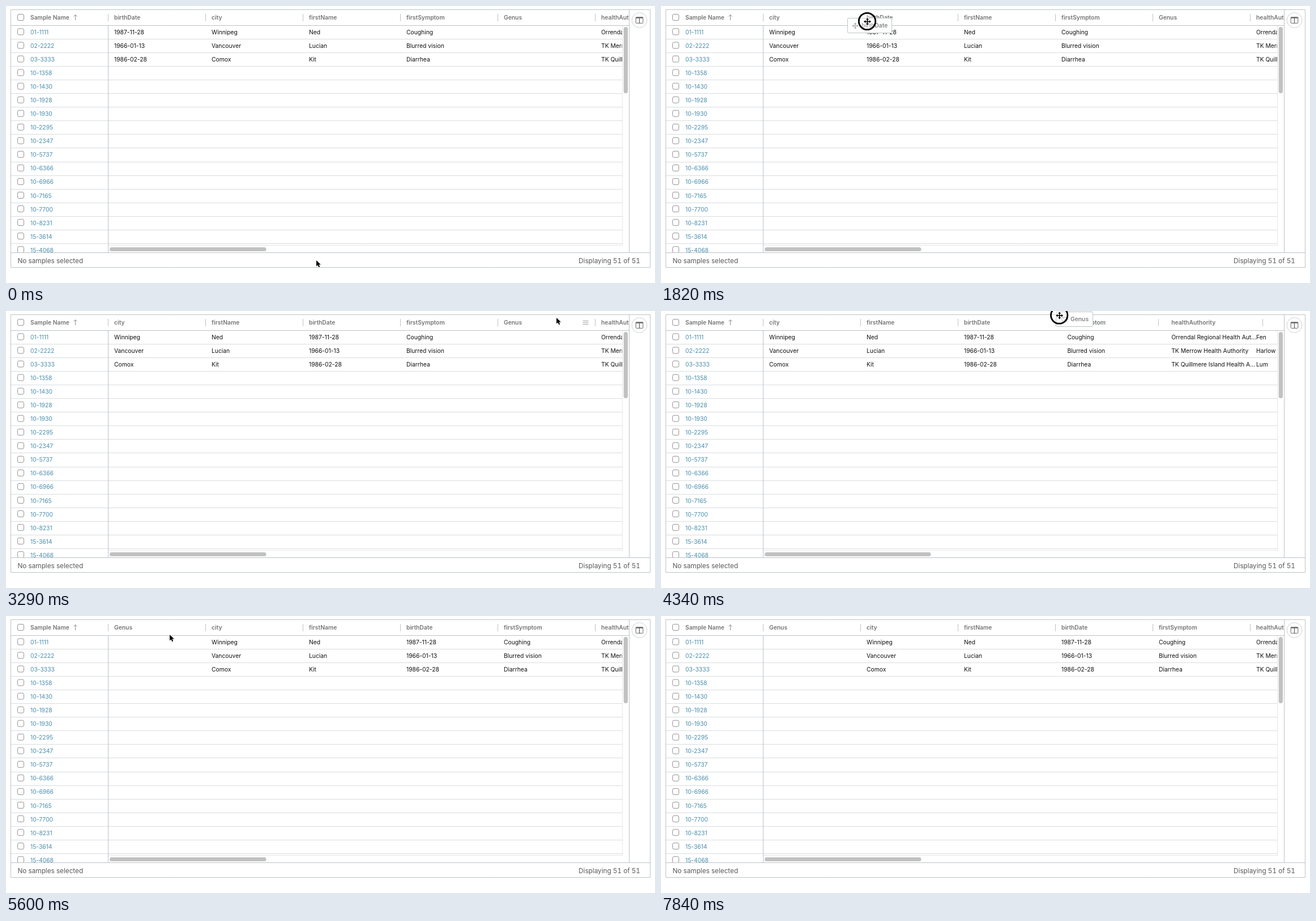
An HTML page with a canvas that plays this animation: 1146x489 px, repeating every 8400 ms.

```html
<!DOCTYPE html>
<html lang="en">
<head>
<meta charset="utf-8">
<title>Sample table column reordering</title>
<style>
  html, body { margin: 0; width: 100%; height: 100%; overflow: hidden; background: #fff; }
  canvas { display: block; }
  .status {
    position: absolute; top: 440px; line-height: 20px; white-space: nowrap;
    font: 11.75px/20px Inter, sans-serif; font-variant-numeric: tabular-nums; color: #595959;
  }
</style>
</head>
<body>
<canvas id="stage" width="1146" height="489"></canvas>
<div class="status" style="left: 20.5px">No samples selected</div>
<div class="status" style="left: 900px; width: 220px; text-align: right">Displaying 51 of 51</div>
<script>
const ctx = document.getElementById('stage').getContext('2d');
const LOOP = 8400, COL = 172, LEFT = 180, TOP = 34, ROW = 24.05;
const LINE = '#bdc3c7', ROW_LINE = '#d9dcde', GRAY = '#757575', THUMB = '#c1c1c1';
const CELL_FONT = '10.3px Inter, sans-serif';
const HEAD_FONT = '600 10.3px Inter, sans-serif';

const samples = ['01-1111', '02-2222', '03-3333', '10-1358', '10-1430', '10-1928', '10-1930', '10-2295',
  '10-2347', '10-5737', '10-6366', '10-6966', '10-7165', '10-7700', '10-8231', '15-3614', '15-4068'];

const columns = {
  b: ['birthDate', '1987-11-28', '1966-01-13', '1986-02-28'],
  c: ['city', 'Winnipeg', 'Vancouver', 'Comox'],
  f: ['firstName', 'Ned', 'Lucian', 'Kit'],
  s: ['firstSymptom', 'Coughing', 'Blurred vision', 'Diarrhea'],
  g: ['Genus'],
  h: ['healthAuthority', 'Orrendal Regional Health Authority', 'TK Merrow Health Authority',
    'TK Quillmere Island Health Authority'],
  l: ['lastName', 'Fen', 'Harlow', 'Lum']
};

// Column order from each time on; a missing letter is a hidden column.
const orders = [[-1000, 'bcfsgh'], [1600, 'cbfsgh'], [2310, 'cfbsgh'], [4173, 'cfbgsh'],
  [4186, 'cfbshl'], [4700, 'cgfbshl'], [4880, 'gcfbshl']];

// Pointer path: time, x, y.
const path = [[0, 548, 449], [70, 548, 449], [140, 548, 446], [350, 548, 446], [420, 530, 414],
  [560, 530, 414], [770, 295, 14], [980, 295, 14], [1260, 276, 13], [1330, 276, 13], [1400, 274, 17],
  [1540, 274, 17], [1730, 374, 30], [1820, 364, 27], [1950, 363, 27], [2380, 560, 25], [2660, 560, 25],
  [3290, 972, 12], [3430, 972, 12], [3500, 971, 16], [3780, 971, 16], [4060, 930, 11], [4340, 704, 7.5],
  [4620, 476, 8], [4900, 358, 29], [5110, 289, 34.5], [5250, 289, 33], [6090, 289, 33], [6720, 495, 225],
  [6930, 520, 262], [7770, 545, 492], [8400, 545, 520]];

// Press, drag start, release, dragged column.
const drags = [[1400, 1540, 2660, 'b'], [3500, 3780, 5600, 'g']];

const clamp = v => Math.max(0, Math.min(1, v));
const ease = v => (v = clamp(v), v * v * (3 - 2 * v));

function pointerAt(t) {
  const i = Math.max(1, path.findIndex(key => key[0] >= t));
  const [t0, x0, y0] = path[i - 1], [t1, x1, y1] = path[i];
  const k = clamp((t - t0) / (t1 - t0));
  return { x: x0 + (x1 - x0) * k, y: y0 + (y1 - y0) * k };
}

function placeColumn(id, t) {
  let x = null, last = 0, born = 0;
  for (const [start, order] of orders) {
    if (start > t) break;
    const index = order.indexOf(id);
    if (index < 0) x = null;
    else if (x === null) { x = LEFT + index * COL; born = start; }
    else x += (index - last) * COL * ease((t - start) / 200);
    last = index;
  }
  return { id, x, born };
}

function text(s, x, midY, font, color) {
  ctx.font = font;
  ctx.fillStyle = color;
  ctx.fillText(s, x, midY + 3.7);
}

function line(x0, y0, x1, y1, color, width = 1) {
  ctx.strokeStyle = color;
  ctx.lineWidth = width;
  ctx.beginPath();
  ctx.moveTo(x0, y0);
  ctx.lineTo(x1, y1);
  ctx.stroke();
}

function box(x, y, w, h, r, fill, stroke) {
  ctx.beginPath();
  ctx.roundRect(x, y, w, h, r);
  if (fill) { ctx.fillStyle = fill; ctx.fill(); }
  if (stroke) { ctx.strokeStyle = stroke; ctx.lineWidth = 1; ctx.stroke(); }
}

function clipped(x, y, w, h, draw) {
  ctx.save();
  ctx.beginPath();
  ctx.rect(x, y, w, h);
  ctx.clip();
  draw();
  ctx.restore();
}

function fit(s, width) {
  ctx.font = CELL_FONT;
  if (ctx.measureText(s).width <= width) return s;
  while (ctx.measureText(s + '...').width > width) s = s.slice(0, -1);
  return s + '...';
}

const checkbox = midY => box(20.5, midY - 5.5, 11, 11, 2.5, '#fff', '#949494');

function moveIcon(x, y, size, color, width) {
  ctx.save();
  ctx.translate(x, y);
  for (let i = 0; i < 4; i++) {
    line(0, 0, 0, -size, color, width);
    ctx.fillStyle = color;
    ctx.beginPath();
    ctx.moveTo(0, -size - 0.5);
    ctx.lineTo(size * 0.42, -size * 0.55);
    ctx.lineTo(-size * 0.42, -size * 0.55);
    ctx.fill();
    ctx.rotate(Math.PI / 2);
  }
  ctx.restore();
}

function hiddenIcon(x, y) {
  ctx.strokeStyle = '#999';
  ctx.lineWidth = 1;
  ctx.beginPath();
  ctx.ellipse(x, y, 5.5, 3.5, 0, 0, 7);
  ctx.stroke();
  line(x - 5, y - 5, x + 5, y + 5, '#999');
}

function arrow(x, y) {
  ctx.save();
  ctx.translate(x, y);
  ctx.beginPath();
  for (const [px, py] of [[0, 0], [0, 10.6], [2.5, 8.3], [4.3, 12.3], [6.2, 11.5], [4.5, 7.6], [7.8, 7.4]])
    ctx.lineTo(px, py);
  ctx.closePath();
  ctx.strokeStyle = '#fff';
  ctx.lineWidth = 1.5;
  ctx.stroke();
  ctx.fillStyle = '#000';
  ctx.fill();
  ctx.restore();
}

function drawPinned() {
  text('Sample Name', 43, 20.3, HEAD_FONT, GRAY);
  line(122.5, 15.5, 122.5, 25, '#8f8f8f');
  line(119.5, 18.5, 122.5, 15.5, '#8f8f8f');
  line(122.5, 15.5, 125.5, 18.5, '#8f8f8f');
  checkbox(20);
  clipped(9, TOP, 1079, 401, () => samples.forEach((name, i) => {
    const y = TOP + ROW * i, bottom = Math.round(y + ROW) + 0.5;
    checkbox(y + 11.4);
    text(name, 43, y + 12.2, CELL_FONT, '#4a8fae');
    line(9, bottom, LEFT, bottom, ROW_LINE);
  }));
}

function drawColumns(cols, t) {
  clipped(LEFT + 1, 7, 919, 27, () => cols.forEach(({ id, x, born }) => {
    if (t - born < 200) return;
    text(columns[id][0], x + 11, 20.3, HEAD_FONT, GRAY);
    const edge = Math.round(x + COL) + 0.5;
    line(edge, 14, edge, 27, LINE);
  }));
  clipped(LEFT + 1, TOP, 907, 389, () => {
    for (let i = 1; i < samples.length; i++) {
      const y = Math.round(TOP + ROW * i) + 0.5;
      line(LEFT, y, 1088, y, ROW_LINE);
    }
    for (const { id, x } of cols)
      columns[id].slice(1).forEach((value, i) =>
        text(fit(value, 150), x + 11, TOP + ROW * i + 12.2, CELL_FONT, '#111'));
  });
}

function drawFrame(genusShown) {
  box(8.5, 6.5, 1129, 455, 0, null, LINE);
  line(9, 34.5, 1100, 34.5, LINE);
  line(180.5, 14, 180.5, 27, LINE);
  line(180.5, 35, 180.5, 435, LINE);
  line(1100.5, 7, 1100.5, 435, LINE);
  line(9, 435.5, 1137, 435.5, LINE);
  line(181, 422.5, 1088, 422.5, '#e6e6e6');
  line(1088.5, 35, 1088.5, 423, '#e6e6e6');
  box(183, 426, genusShown ? 276.5 : 293.5, 7, 3.5, THUMB);
  box(1090.7, 37, 7.3, 117, 3.5, THUMB);

  ctx.strokeStyle = '#d0d0d0';
  ctx.lineWidth = 1;
  ctx.beginPath();
  ctx.arc(1118.5, 25, 13.3, 0, 7);
  ctx.stroke();
  box(1112.2, 19.8, 12.6, 10.6, 1, null, '#666');
  line(1112, 20.7, 1125, 20.7, '#666', 2);
  line(1118.5, 20, 1118.5, 30, '#666', 1.3);
}

function drawGhost(id, t, hidden) {
  const { x, y } = pointerAt(t - 33);
  ctx.font = HEAD_FONT;
  const label = columns[id][0], width = Math.round(ctx.measureText(label).width + 32);
  const left = Math.round(x - width / 2) + 0.5, top = Math.round(y - 7) + 0.5;
  box(left, top, width, 26, 1, '#fff', LINE);
  if (hidden) hiddenIcon(left + 14, top + 13);
  else moveIcon(left + 13.5, top + 13.5, 5, '#a0a0a0', 1);
  text(label, left + 24.5, top + 13, HEAD_FONT, '#858585');
}

function drawPointer(t, cols) {
  const { x, y } = pointerAt(t);
  const drag = drags.find(([press, , release]) => t >= press && t < release);
  const dragging = drag && t >= drag[1];
  const hovered = cols.find(col => x >= col.x && x < col.x + COL);
  if (!dragging && y < 32 && hovered) {
    const mid = hovered.x + 155.5;
    for (const ly of [17.5, 20.5, 23.5]) line(mid - 5, ly, mid + 5, ly, '#a0a0a0');
  }
  if (dragging) drawGhost(drag[3], t, !cols.some(col => col.id === drag[3]));
  if (drag) {
    ctx.beginPath();
    ctx.arc(x, y, 14.7, 0, 7);
    ctx.fillStyle = 'rgba(255,255,255,.3)';
    ctx.fill();
    ctx.strokeStyle = '#000';
    ctx.lineWidth = 2.8;
    ctx.stroke();
  }
  if (dragging) {
    moveIcon(x + 0.5, y + 0.5, 6.2, '#fff', 3.5);
    moveIcon(x + 0.5, y + 0.5, 5.8, '#000', 1.6);
  } else arrow(x, y);
}

function draw(now) {
  const t = now % LOOP;
  const cols = Object.keys(columns).map(id => placeColumn(id, t)).filter(col => col.x !== null);
  ctx.fillStyle = '#fff';
  ctx.fillRect(0, 0, 1146, 489);
  drawPinned();
  drawColumns(cols, t);
  drawFrame(cols.some(col => col.id === 'g'));
  drawPointer(t, cols);
  requestAnimationFrame(draw);
}
requestAnimationFrame(draw);
</script>
</body>
</html>
```
